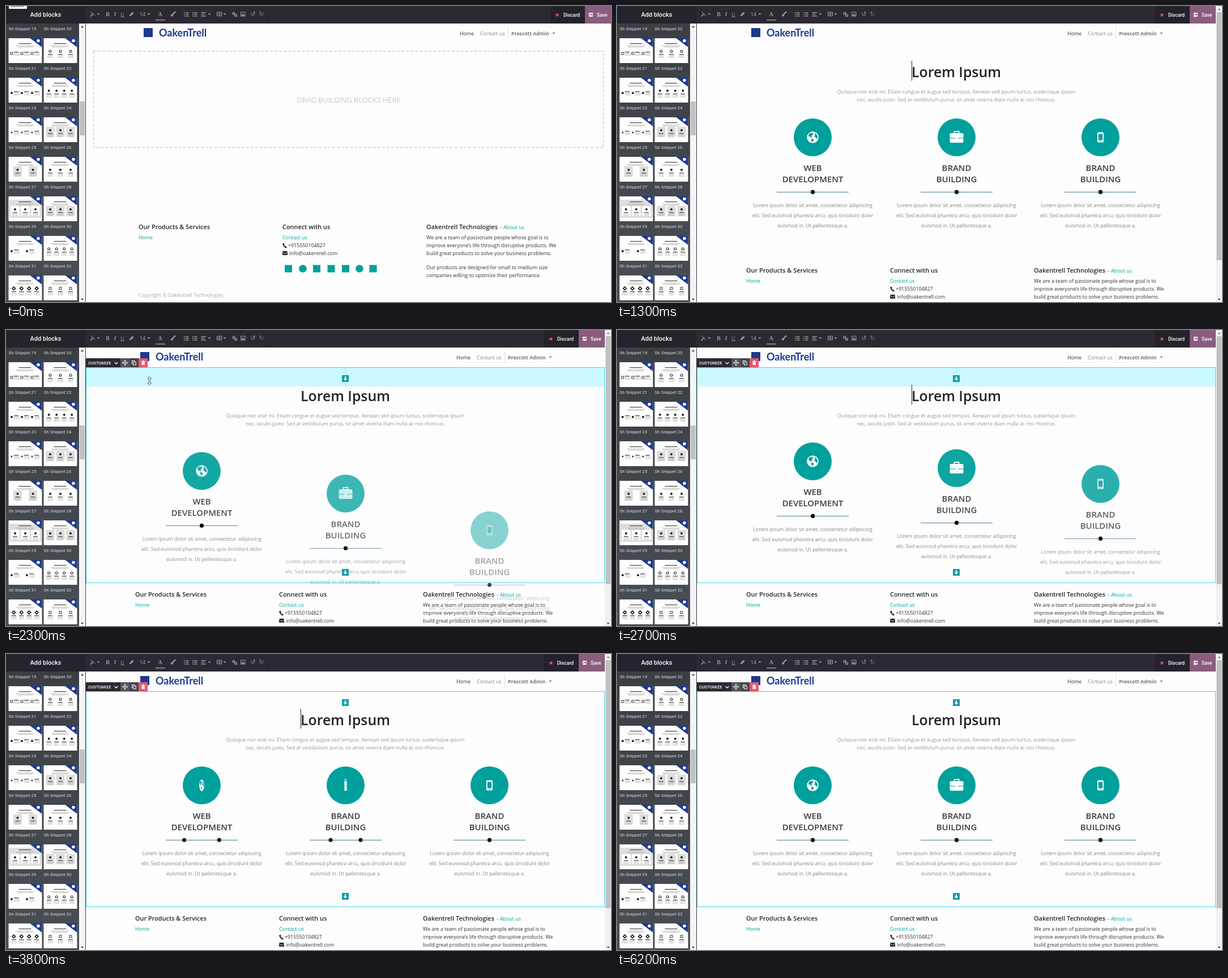
An HTML page with a canvas for the animation above (6400 ms loop, 1068 by 524 pixels).

```html
<!DOCTYPE html>
<html lang="en">
<head>
<meta charset="utf-8">
<title>Page builder</title>
<style>
html, body { margin: 0; width: 100%; height: 100%; overflow: hidden; background: #fdfdfd; }
canvas { display: block; }
</style>
</head>
<body>
<canvas id="stage" width="1068" height="524"></canvas>
<script>
const c = document.getElementById('stage').getContext('2d');
const TEAL = '#00a09d', NAVY = '#1c3a8c', BAR = '#2b2a33', TOOL = '#9c9ca4', PAGE = '#fdfdfd';
const LOOP = 6400, DROP = 800, HOVER = 1600, REPLAY = 1800;

const sans = (size, weight = 400) => `${weight} ${size}px "Open Sans", "Noto Sans", sans-serif`;
const robo = (size, weight = 400) => `${weight} ${size}px Roboto, sans-serif`;
const glyph = size => `${size}px "DejaVu Sans", sans-serif`;
const BODY = sans(8.85), HEAD = sans(10.9, 600);

function rect(x, y, w, h, color) { c.fillStyle = color; c.fillRect(x, y, w, h); }
function dot(x, y, r, color) {
  c.fillStyle = color;
  c.beginPath(); c.arc(x, y, r, 0, 7); c.fill();
}
function poly(color, ...p) {
  c.fillStyle = color;
  c.beginPath();
  for (let i = 0; i < p.length; i += 2) c.lineTo(p[i], p[i + 1]);
  c.fill();
}
function line(color, width, ...p) {
  c.strokeStyle = color; c.lineWidth = width;
  c.beginPath();
  for (let i = 0; i < p.length; i += 2) c.lineTo(p[i], p[i + 1]);
  c.stroke();
}
function box(x, y, w, h, color, width = 1) {
  c.strokeStyle = color; c.lineWidth = width; c.strokeRect(x, y, w, h);
}
function round(x, y, w, h, r, color) {
  c.fillStyle = color;
  c.beginPath(); c.roundRect(x, y, w, h, r); c.fill();
}
function text(s, x, y, color, font, align = 'left') {
  c.fillStyle = color; c.font = font; c.textAlign = align;
  c.fillText(s, x, y);
}
const caret = (x, y, color = TOOL) => poly(color, x - 2.5, y - 1, x + 2.5, y - 1, x, y + 2);
const clamp = x => Math.min(1, Math.max(0, x));

// cubic-bezier(.25, .1, .25, 1)
function ease(x) {
  x = clamp(x);
  let u = x;
  for (let i = 0; i < 8; i++) u -= (.75 * u * (1 - u) + u ** 3 - x) / (.75 - 1.5 * u + 3 * u * u);
  return .3 * u * (1 - u) ** 2 + 3 * u * u * (1 - u) + u ** 3;
}

// Sidebar thumbnails: shape, count, and "s" for text beside the shape
const THUMBS = ['q3s', 'o3', 'd3s', 'd4', 't3s', 'c3', 'c2', 'd3', 'w3', 'c3', 'd2s', 'o4', 'k4', 'q3'];

function thumb(spec, x, y) {
  const kind = spec[0], n = +spec[1], side = spec[2];
  rect(x, y, 59, 44, '#fefefe');
  if (kind == 'w') rect(x, y + 6, 59, 32, '#dedede');
  rect(x + 18, y + 9, 22, 1.2, '#444');
  rect(x + 13, y + 13, 32, .8, '#aaa');
  rect(x + 15, y + 15, 28, .8, '#aaa');
  const step = 54 / n;
  for (let i = 0; i < n; i++) {
    const mid = x + 2.5 + step * (i + .5), sx = side ? mid - step / 2 + 3 : mid, sy = y + (side ? 27 : 23);
    if (kind == 'c' || kind == 'w') round(mid - 7.5, y + 17, 15, 18, 1, kind == 'c' ? '#dcdcdc' : '#fff');
    if (kind == 'q') box(sx - 2, sy - 2, 4, 4, '#333');
    else if (kind == 'k') {
      poly('#222', sx, sy - 4, sx + 4, sy, sx, sy + 4, sx - 4, sy);
      dot(sx, sy, 1.3, '#fff');
    }
    else if (kind == 'o') { dot(sx, sy, 2.6, '#333'); dot(sx, sy, 1.4, '#fff'); }
    else dot(sx, sy, kind == 't' ? 1.4 : 2, '#222');
    const lx = side ? sx + 4 : mid - 4, ly = side ? sy - 3 : sy + 5;
    rect(lx, ly, 8, 1.2, '#444');
    for (let k = 1; k < 4; k++) rect(lx - (side ? 0 : 1), ly + 2 * k, 10, .8, '#bbb');
  }
  poly(NAVY, x + 38, y, x + 59, y, x + 59, y + 16);
  dot(x + 52.5, y + 4.5, 2.8, '#fff');
}

function sidebar() {
  const g = c.createLinearGradient(0, 30, 0, 524);
  g.addColorStop(0, '#3b3f44'); g.addColorStop(1, '#484e54');
  rect(0, 31, 129, 493, g);
  THUMBS.forEach((spec, i) => {
    const x = i % 2 ? 66.5 : 4.5, y = 57 + 70 * (i >> 1);
    text('Sh Snippet ' + (19 + i), x, y - 14, '#d8dadc', robo(8));
    thumb(spec, x, y);
  });
  rect(129, 31, 11, 493, '#f4f4f4');
  rect(130, 169, 9, 60, '#c1c1c1');
  poly('#333', 132, 38, 137, 38, 134.5, 35);
  poly('#333', 132, 518, 137, 518, 134.5, 521);
  rect(140, 31, 1, 493, '#3a3a44');
}

function toolbar(right) {
  rect(0, 0, right, 31, BAR);
  rect(0, 0, 140, 31, '#25242c');
  rect(461, 0, 1, 31, '#23222a');
  text('Add blocks', 70, 19, '#fff', robo(11, 500), 'center');
  line(TOOL, 1.8, 149, 18.5, 154, 13);
  line(TOOL, 1, 151, 10, 151, 13); line(TOOL, 1, 154, 16, 157, 16);
  for (const x of [163, 252, 359, 386]) caret(x, 14);
  text('B', 179.5, 18, TOOL, '700 10px "Liberation Serif", serif', 'center');
  text('I', 192.5, 18, TOOL, 'italic 700 10px "Liberation Serif", serif', 'center');
  text('U', 205.5, 17.5, TOOL, '9px "Liberation Serif", serif', 'center');
  rect(202, 18.5, 7, 1, TOOL);
  poly(TOOL, 217, 17.5, 222, 11.5, 226, 11.5, 221, 17.5);
  text('14', 241, 18, TOOL, robo(9), 'center');
  text('A', 272, 17.5, TOOL, '700 10px "Liberation Serif", serif', 'center');
  rect(264, 24, 17, 1.5, TOOL);
  line(TOOL, 2.4, 299, 10, 294, 15); dot(293, 16.5, 2, TOOL);
  for (let i = 0; i < 3; i++) {
    const y = 11 + i * 3;
    for (const x of [314, 329]) { rect(x, y, 1.6, 1.6, TOOL); rect(x + 3, y, 5.5, 1.4, TOOL); }
    rect(344.5, y, i == 1 ? 6 : 8.5, 1.4, TOOL);
  }
  box(372.5, 11, 8, 6.5, TOOL);
  line(TOOL, 1, 372, 14.2, 381, 14.2); line(TOOL, 1, 376.5, 11, 376.5, 18);
  c.strokeStyle = TOOL; c.lineWidth = 1.4;
  for (const [x, y] of [[402, 13], [405.5, 16.5]]) { c.beginPath(); c.arc(x, y, 1.9, 0, 7); c.stroke(); }
  box(414.5, 11, 7.5, 7, TOOL); poly(TOOL, 415, 17, 418, 13.5, 422, 17);
  text('↺', 436, 18, TOOL, glyph(11), 'center');
  text('↻', 451, 18, '#7d7d86', glyph(11), 'center');

  rect(right - 107, 0, 61, 31, '#23222b');
  text('✖', right - 95, 19, '#e6586c', glyph(8.5), 'center');
  text('Discard', right - 84, 18.5, '#fff', robo(8.6, 500));
  rect(right - 46, 0, 46, 31, '#8a5c7d');
  box(right - 38.5, 12.5, 6, 6, '#fff'); rect(right - 38, 12, 4, 2.5, '#fff'); rect(right - 37.5, 16, 3.5, 2, '#fff');
  text('Save', right - 25, 18.5, '#fff', robo(8.6, 500));
}

function header(dx) {
  rect(243 + dx, 39, 16, 16, NAVY);
  text('OakenTrell', 270 + dx, 54, NAVY, '700 18px Lato, sans-serif');
  text('Home', 801 + dx, 52, '#333', BODY);
  text('Contact us', 837 + dx, 52, '#888', BODY);
  rect(886 + dx, 36, 1, 24, '#e2e2e2');
  text('Prescott Admin', 892 + dx, 52, '#777', sans(8.7, 700));
  caret(967 + dx, 48, '#777');
}

function footer(dx, dy) {
  c.save();
  c.translate(dx, dy);
  text('Our Products & Services', 234, 395, '#212529', HEAD);
  text('Home', 234, 413, TEAL, BODY);
  text('Connect with us', 488, 395, '#212529', HEAD);
  text('Contact us', 488, 413, TEAL, BODY);
  c.lineCap = 'round';
  line('#222', 2, 489.5, 421.5, 490.5, 424.5, 493.5, 427);
  c.lineCap = 'butt';
  dot(490, 421.5, 1.5, '#222'); dot(494, 427, 1.5, '#222');
  text('+915550104827', 498, 427, '#333', BODY);
  round(488, 434, 9, 7, 1, '#222');
  line(PAGE, .9, 488, 435.5, 492.5, 439, 497, 435.5);
  text('info@oakentrell.com', 500, 441, '#333', BODY);
  [498.5, 524, 548.5, 574, 599.5, 624, 648].forEach((x, i) =>
    i == 1 || i == 5 ? dot(x, 465, 6.8, TEAL) : rect(x - 6.5, 458.5, 13, 13, TEAL));
  text('Oakentrell Technologies', 742, 395, '#212529', HEAD);
  text('-', 872, 395, '#333', BODY);
  text('About us', 878, 395, TEAL, BODY);
  ['We are a team of passionate people whose goal is to',
   'improve everyone’s life through disruptive products. We',
   'build great products to solve your business problems.', '',
   'Our products are designed for small to medium size',
   'companies willing to optimize their performance.'
  ].forEach((s, i) => text(s, 742, 413 + i * 14 - (i > 3 ? 3 : 0), '#333', BODY));
  text('Copyright © Oakentrell Technologies', 234, 515, '#a5a8aa', BODY);
  c.restore();
}

const ICONS = [
  () => {
    dot(0, 0, 10.3, '#fff');
    poly(TEAL, -6, -7, -1, -8, 1, -5, -2, -3, -1, 0, -4, 0, -6, -2, -8, -2);
    poly(TEAL, -3, 2, 1, 3, 2, 5, -1, 9, -2, 6);
    poly(TEAL, 3, -8, 7, -5, 9, 0, 7, 3, 5, 0, 3, -1, 4, -4);
  },
  () => {
    round(-12, -7.5, 24, 17, 2, '#fff');
    box(-4, -10.5, 8, 4, '#fff', 2);
    rect(-12, 1, 24, 1, TEAL); rect(-2, 0, 4, 3.5, '#fff');
  },
  () => {
    round(-5.5, -9, 11, 18, 1.8, '#fff');
    rect(-3.7, -6, 7.4, 11, TEAL);
    dot(0, 7, 1, TEAL);
  }
];

// Replay of the entrance: [start, duration]; pointer over a column: [enter, leave]
const COLUMNS = [
  { x: 345.5, title: ['WEB', 'DEVELOPMENT'], rise: [1700, 900], hover: [3150, 3650] },
  { x: 599.5, title: ['BRAND', 'BUILDING'], rise: [1613, 1510], hover: [3673, 4400] },
  { x: 853.5, title: ['BRAND', 'BUILDING'], rise: [1850, 1620], hover: [4400, 5450] }
];
const LOREM = ['Lorem ipsum dolor sit amet, consectetur adipiscing',
  'elit. Sed euismod pharetra arcu, quis tincidunt dolor', 'euismod in. Ut pellentesque a.'];

function column(col, i, t) {
  const [start, span] = t < REPLAY ? [DROP - 100, 500 + 50 * i] : col.rise;
  const shown = ease((t - start) / span);
  const over = at => ease((at - col.hover[0]) / 500) - ease((at - col.hover[1]) / 500);
  c.save();
  c.globalAlpha = shown;
  c.translate(col.x, Math.round(230 * (1 - shown)));
  dot(0, 232.5, 33.5, TEAL);
  c.save();
  c.translate(0, 232.5);
  c.scale(Math.cos(Math.PI * over(t + 35)), 1);
  ICONS[i]();
  c.restore();
  col.title.forEach((s, k) => text(s, 0, 292 + 20 * k, '#3b3a3f', sans(14.9, 600), 'center'));
  rect(-63.5, 329, 127, 1, '#4a7c96');
  const gap = 63.5 * over(t);
  dot(-gap, 329.3, 3.5, '#000');
  dot(gap, 329.3, 3.5, '#000');
  LOREM.forEach((s, k) => text(s, 0, 356 + 18 * k, '#868686', BODY, 'center'));
  c.restore();
}

function handle(y) {
  rect(593, y - 6, 12, 12, '#0d9ea6');
  line('#fff', 2, 599, y - 4, 599, y + 1);
  poly('#fff', 595.5, y, 602.5, y, 599, y + 4);
}

function overlay(t) {
  box(141.5, 66.5, 915, 381, '#3fd8ee');
  handle(86); handle(429);
  rect(141, 50, 61, 16, BAR);
  text('CUSTOMIZE', 145, 60.7, '#fff', robo(7.3, 500));
  line('#fff', 1.3, 191.5, 57, 194.5, 60, 197.5, 57);
  rect(202, 50, 16, 16, '#55555c');
  rect(218, 50, 16, 16, '#46464e');
  rect(234, 50, 16, 16, '#e6586c');
  line('#fff', 1, 206, 58, 214, 58); line('#fff', 1, 210, 54, 210, 62);
  for (const s of [-1, 1]) {
    poly('#fff', 208, 58 + 3 * s, 212, 58 + 3 * s, 210, 58 + 5 * s);
    poly('#fff', 210 + 3 * s, 56, 210 + 3 * s, 60, 210 + 5 * s, 58);
  }
  box(222.5, 54.5, 4.5, 5, '#fff'); rect(224, 56, 6, 6, '#46464e'); box(224.8, 56.8, 4.5, 5, '#fff');
  rect(239.5, 56.5, 5.5, 5.5, '#fff'); rect(238.8, 55, 7, 1, '#fff'); rect(241, 54, 2.5, 1, '#fff');
  if (t >= 2200 && t < 2500) {
    const arrow = [250, 86, 253.2, 82.5, 256.4, 86, 254.4, 86, 254.4, 94, 256.4, 94,
      253.2, 97.5, 250, 94, 252, 94, 252, 86, 250, 86];
    poly('#fff', ...arrow);
    line('#333', .8, ...arrow);
  }
}

function emptyPage(t) {
  header(0);
  c.setLineDash([5, 3]);
  box(154.5, 80, 900, 170.5, '#c9cdd0', 1.3);
  c.setLineDash([]);
  text('DRAG BUILDING BLOCKS HERE', 605, 171, '#c3c9cc', sans(12.8), 'center');
  footer(0, 0);
  toolbar(1068);
  sidebar();
  if (t < 100) {
    rect(5, 0, 32, 5, '#fff');
    text('DESIGN', 9, 2, '#444', robo(6.5, 500));
  } else {
    const p = ease((t - 100) / 600);
    c.globalAlpha = .8;
    thumb('d3', 66.5 + 505 * p, 267 - 120 * p);
    c.globalAlpha = 1;
  }
}

function filledPage(t) {
  header(-6);
  if (t >= 2000 && t < 3100) {
    rect(141, 67, 916, 33, '#ccf8ff');
    rect(599, 67, 1, 33, '#8feaf5');
  }
  text('Lorem Ipsum', 599, 126, '#212126', sans(24.8, 600), 'center');
  ['Quisque non erat mi. Etiam congue et augue sed tempus. Aenean sed ipsum luctus, scelerisque ipsum',
   'nec, iaculis justo. Sed at vestibulum purus, sit amet viverra diam nulla ac nisi rhoncus.'
  ].forEach((s, i) => text(s, 599, 155 + 14 * i, '#999', BODY, 'center'));
  if ((t >= 1300 && t < 1800) || (t >= 2500 && t < 3100) || (t >= 3600 && t < 4200)) rect(520, 97, 1, 35, '#222');
  footer(-6, 77);
  COLUMNS.forEach((col, i) => column(col, i, t));
  if (t >= HOVER) overlay(t);
  toolbar(1057);
  rect(1057, 0, 11, 524, '#f1f1f1');
  rect(1058.5, 11, 9, 439, '#c1c1c1');
  poly('#777', 1060.5, 7, 1065.5, 7, 1063, 4);
  poly('#444', 1060.5, 518, 1065.5, 518, 1063, 521);
  sidebar();
}

// The picture advances in 100 ms steps, with a few longer holds
function draw(now) {
  let t = Math.floor(now % LOOP / 100) * 100;
  if ([1700, 3900, 4300].includes(t)) t -= 100;
  rect(0, 0, 1068, 524, PAGE);
  (t < DROP ? emptyPage : filledPage)(t);
}

const begin = performance.now();
(function tick() {
  draw(performance.now() - begin);
  requestAnimationFrame(tick);
})();
</script>
</body>
</html>
```
